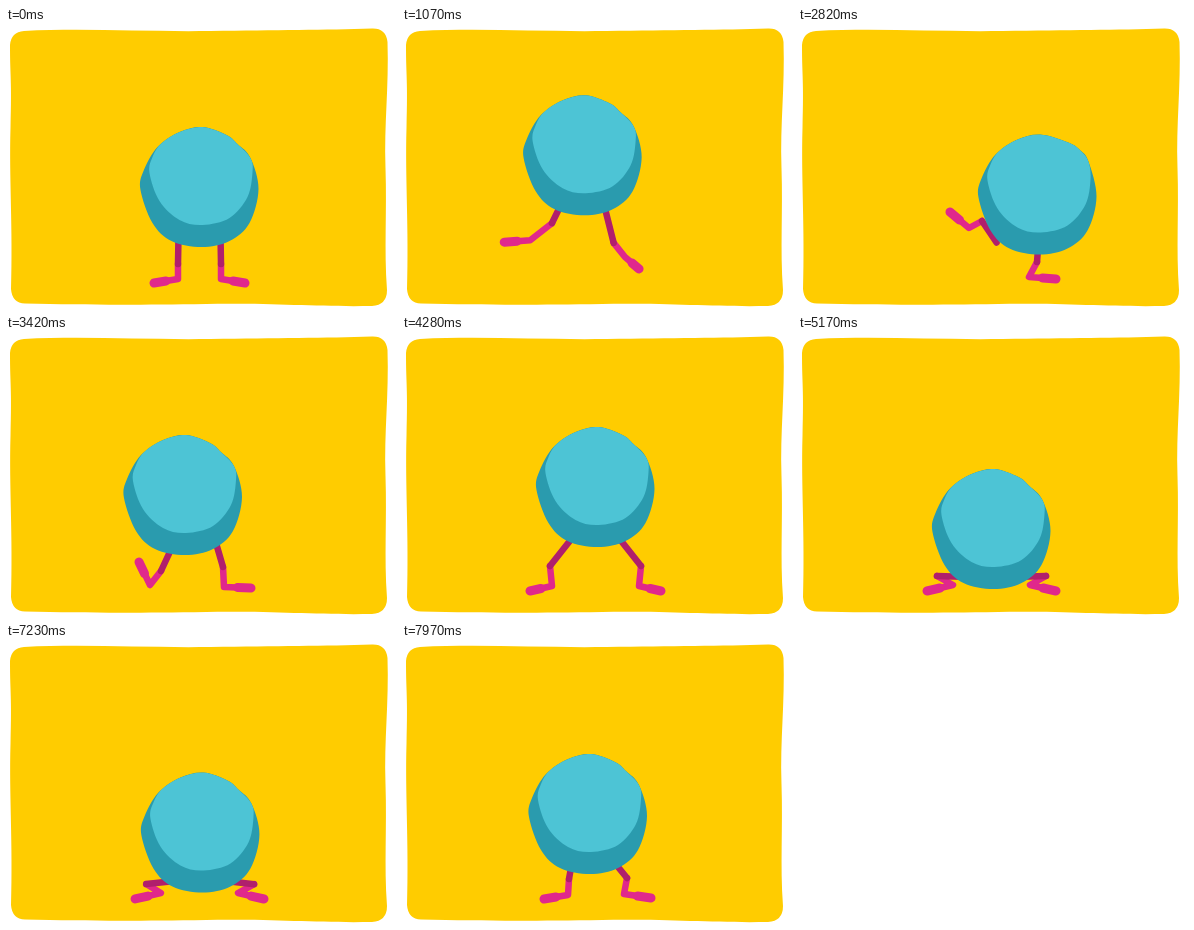
These frames come from a looping animation (390 by 280 pixels, 8 s). An HTML page with a canvas:

```html
<!DOCTYPE html>
<html lang="en">
<head>
<meta charset="utf-8">
<title>Dancing ball</title>
<style>
html, body { margin: 0; width: 100%; height: 100%; overflow: hidden; background: #fff; }
canvas { display: block; }
</style>
</head>
<body>
<canvas id="stage" width="390" height="280"></canvas>
<script>
const ctx = document.getElementById('stage').getContext('2d');
const LOOP = 8000;
const COLOR = { floor: '#ffcc00', ball: '#2a9bae', face: '#4dc4d5', thigh: '#b01f6c', shin: '#e0288c' };

// Leg poses on the left side: knee, ankle, toe.
const stand = [172, 236, 172, 251, 148, 255];
const squat = [134, 237, 171, 251, 148, 255];
const wideTall = [148, 230, 150, 250, 128, 255];
const wide = [139, 240, 155, 249, 129, 255];
const lunge = [136, 246, 154, 250, 129, 255];
const stretch = [174, 243, 151, 252, 131, 254];
const land = [148, 234, 156, 249, 129, 251];
const raised = [184, 193, 171, 200, 152, 184];
const kick = [140, 180, 110, 180, 84, 170];
const step = [150, 195, 128, 212, 102, 214];
const hang = [176, 214, 164, 228, 150, 240];
const trail = [178, 196, 170, 207, 148, 218];
const heelDown = [155, 235, 146, 250, 123, 252];
const heelTap = [155, 235, 144, 249, 133, 226];
const narrow = [167, 235, 166, 251, 142, 255];

// Leg poses that only the right side takes.
const touchR = [234, 234, 226, 249, 251, 240];
const restR = [217, 231, 218, 251, 245, 252];
const narrowR = [225, 234, 222, 250, 249, 254];

const flip = pose => pose.map((v, i) => i % 2 ? v : 387 - v);

// Time, ball x, ball y, hip shift, left leg, right leg.
const keys = [
  [0, 193.5, 159, 0, stand, flip(stand)],
  [60, 193.5, 159, 0, stand, flip(stand)],
  [430, 193.5, 192, 0, squat, flip(squat)],
  [690, 193.5, 160, 0, stand, flip(stand)],
  [860, 193.5, 185, 0, squat, flip(squat)],
  [1080, 180, 127, 0, step, flip(hang)],
  [1330, 158, 166, 18, land, flip(raised)],
  [1560, 185, 140, 0, hang, flip(hang)],
  [1760, 230, 160, -17, trail, touchR],
  [1850, 238, 166, -20, raised, flip(land)],
  [2080, 195, 131, 0, kick, flip(hang)],
  [2320, 149, 166, 20, land, flip(raised)],
  [2580, 195, 131, 0, hang, flip(kick)],
  [2820, 239.5, 166.5, -20, raised, flip(land)],
  [2940, 238, 163, -18, raised, flip(land)],
  [3260, 178, 159, 12, heelDown, restR],
  [3420, 177, 159, 12, heelTap, restR],
  [3620, 174, 160, 12, heelDown, restR],
  [3900, 193.5, 153, 0, wideTall, flip(wideTall)],
  [4120, 193.5, 162, 0, wideTall, flip(wideTall)],
  [4350, 193.5, 148, 0, wideTall, flip(wideTall)],
  [4700, 193.5, 193, 0, wide, flip(wide)],
  [4940, 193.5, 182, 0, wide, flip(wide)],
  [5170, 193.5, 193, 0, wide, flip(wide)],
  [5560, 174, 178, -5, lunge, flip(stretch)],
  [5820, 190, 191, 0, wide, flip(wide)],
  [6080, 203, 178, 5, stretch, flip(lunge)],
  [6460, 167, 179, -7, lunge, flip(stretch)],
  [6740, 188, 192, 0, wide, flip(wide)],
  [7000, 207, 176, 6, stretch, flip(lunge)],
  [7260, 194, 189, 0, wide, flip(wide)],
  [7540, 210, 174, 6, stretch, flip(lunge)],
  [7970, 186, 170, 5, narrow, narrowR]
].map(row => row.flat());

// Smooth curve through the keys that never overshoots.
function tangent(i, c) {
  if (i <= 0 || i >= keys.length - 1) return 0;
  const [a, b, d] = [keys[i - 1], keys[i], keys[i + 1]];
  const before = (b[c] - a[c]) / (b[0] - a[0]);
  const after = (d[c] - b[c]) / (d[0] - b[0]);
  return before * after <= 0 ? 0 : 2 * before * after / (before + after);
}

function poseAt(time) {
  const last = keys.length - 1;
  if (time >= keys[last][0]) return keys[last];
  const i = keys.findIndex(k => k[0] > time) - 1;
  const a = keys[i], b = keys[i + 1], span = b[0] - a[0];
  const u = (time - a[0]) / span, v = 1 - u;
  return a.map((_, c) => c === 0 ? time :
    v * v * (1 + 2 * u) * a[c] + u * u * (3 - 2 * u) * b[c] +
    span * u * v * (v * tangent(i, c) - u * tangent(i + 1, c)));
}

function blob(points) {
  const path = new Path2D(), n = points.length;
  const at = i => points[(i + n) % n];
  path.moveTo(...at(0));
  for (let i = 0; i < n; i++) {
    const [p, a, b, q] = [at(i - 1), at(i), at(i + 1), at(i + 2)];
    path.bezierCurveTo(a[0] + (b[0] - p[0]) / 6, a[1] + (b[1] - p[1]) / 6,
      b[0] - (q[0] - a[0]) / 6, b[1] - (q[1] - a[1]) / 6, ...b);
  }
  path.closePath();
  return path;
}

const floor = new Path2D(`M18 3 C80 0 140 4 205 3 S320 2 366 .5 Q380 0 381.5 14
  C383 60 378 95 379.5 140 S378 220 381 262 Q381 277 366 278
  C310 279 270 275 200 276 S80 277 19 275.5 Q6 275 5 261
  C7 200 3 150 4.5 100 S4 50 4 17 Q5 4 18 3Z`);

const ballSide = [[59, 2], [50, 36], [30, 54], [2, 60], [-28, 54], [-47, 36], [-59, 3], [-56, -16], [-42, -40], [-20, -55]];
const faceSide = [[53, -15], [48, 10], [30, 31], [3, 38], [-20, 33], [-40, 14], [-50, -14], [-47, -30], [-38, -44], [-20, -55]];

function line(color, width, ...points) {
  ctx.strokeStyle = color;
  ctx.lineWidth = width;
  ctx.beginPath();
  points.forEach(p => ctx.lineTo(...p));
  ctx.stroke();
}

function drawLeg(hip, [kx, ky, ax, ay, tx, ty]) {
  const knee = [kx, ky], ankle = [ax, ay], toe = [tx, ty];
  line(COLOR.shin, 6.5, knee, ankle, toe);
  line(COLOR.shin, 9, [(ax + tx) / 2, (ay + ty) / 2], toe);
  line(COLOR.thigh, 6.5, hip, knee);
}

function drawBall(x, y) {
  const round = Math.min(1, Math.max(0, (x - 200) / 30));
  const top = [[3, -60], [27 + 4 * round, -52], [38 + 5 * round, -43 - round], [51, -29 - 4 * round]];
  const ball = blob([...top, ...ballSide]);
  ctx.save();
  ctx.translate(x, y);
  ctx.fillStyle = COLOR.ball;
  ctx.fill(ball);
  ctx.clip(ball);
  ctx.fillStyle = COLOR.face;
  ctx.fill(blob([...top, ...faceSide]));
  ctx.restore();
}

function draw(time) {
  const [, x, y, shift, ...legs] = poseAt(time);
  ctx.clearRect(0, 0, 390, 280);
  ctx.fillStyle = COLOR.floor;
  ctx.fill(floor);
  ctx.lineCap = ctx.lineJoin = 'round';
  drawLeg([x + shift - 21, y + 48], legs.slice(0, 6));
  drawLeg([x + shift + 21, y + 48], legs.slice(6));
  drawBall(x, y);
}

const start = performance.now();
function tick() {
  draw((performance.now() - start) % LOOP);
  requestAnimationFrame(tick);
}
tick();
</script>
</body>
</html>
```
